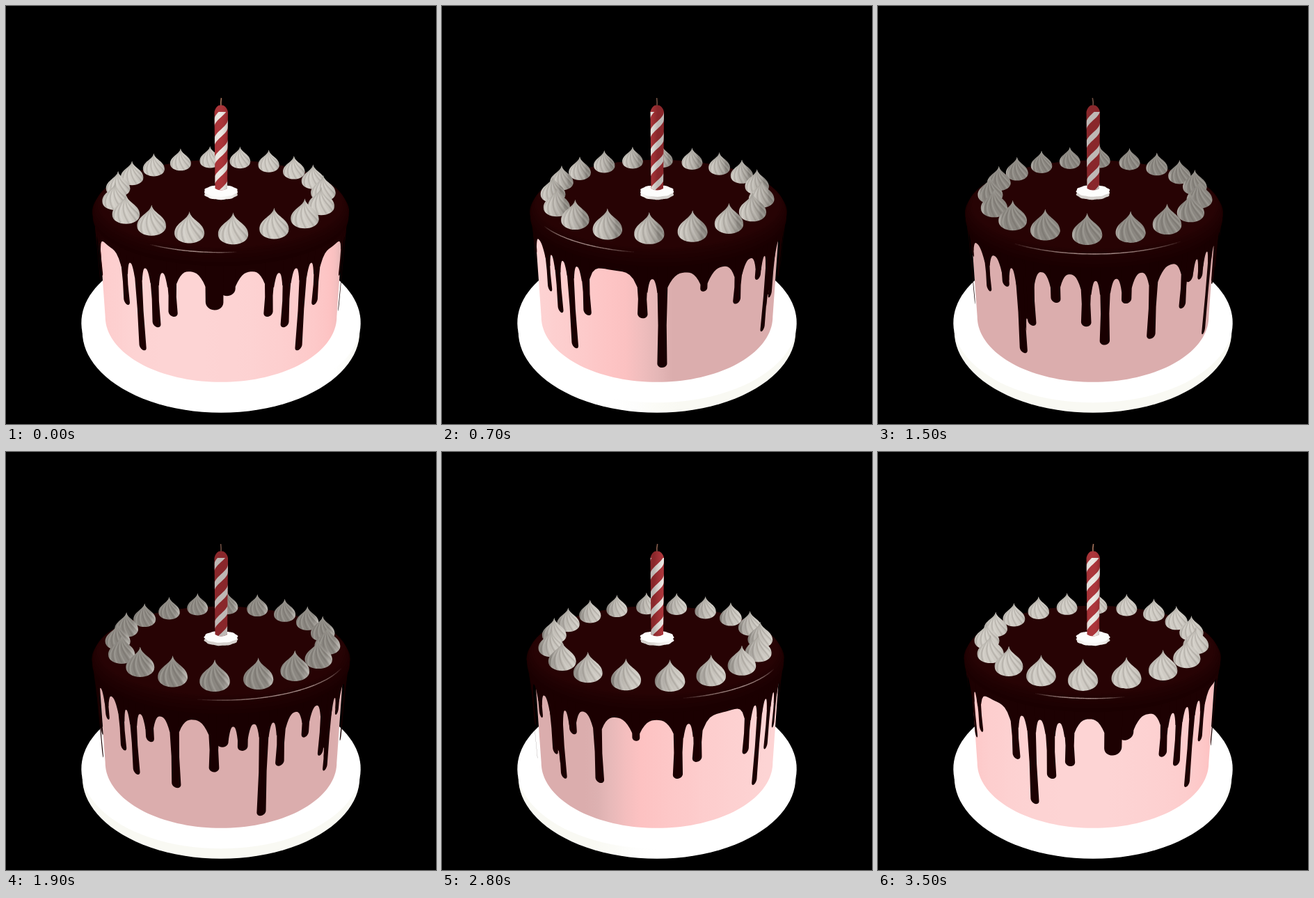
An HTML page with a canvas for the animation above (3.6 s loop, 618 by 600 pixels).

```html
<!DOCTYPE html>
<html lang="en">
<head>
<meta charset="utf-8">
<title>Birthday cake</title>
<style>
html, body { margin: 0; width: 100%; height: 100%; overflow: hidden; background: #000; }
canvas { display: block; }
</style>
</head>
<body>
<canvas id="stage" width="618" height="600"></canvas>
<script>
const ctx = document.getElementById('stage').getContext('2d');
const STEP = 100, STEPS = 36;
const CX = 309, CY = 267, DIST = 730, SIN = 0.348, COS = 0.937;
const LIGHT = -15;
const rad = d => d * Math.PI / 180;
const sin = d => Math.sin(rad(d));
const cos = d => Math.cos(rad(d));
const mix = (a, b, t) => a + (b - a) * t;
const wrap = d => ((d + 180) % 360 + 360) % 360 - 180;
const rgb = (r, g, b) => `rgb(${Math.round(r)},${Math.round(g)},${Math.round(b)})`;
const blend = (a, b, t) => rgb(...a.map((v, i) => mix(v, b[i], t)));

let turn = 0;

// x to the right, h down from the cake top, z towards the viewer
function project(x, h, z) {
  const s = 1 / (1 - (z * COS - h * SIN) / DIST);
  return [CX + x * s, CY + (h * COS + z * SIN) * s, s];
}
const polar = (r, a, h) => project(r * sin(a), h, r * cos(a));
// The icing and the swirls sit slightly off the turning axis
const offset = (r, a, h, dist, dir) =>
  project(r * sin(a) + dist * sin(dir - turn), h, r * cos(a) + dist * cos(dir - turn));
const icing = (r, a, h) => offset(r, a, h, 2.2, 190);

const facing = a => cos(a + turn - LIGHT);
const lit = a => Math.max(0, facing(a));
const softLit = a => Math.sqrt(Math.max(0, (facing(a) + 0.5) / 1.5));

function fillShape(points, paint) {
  ctx.beginPath();
  points.forEach(p => ctx.lineTo(p[0], p[1]));
  ctx.closePath();
  ctx.fillStyle = paint;
  ctx.fill();
}

function ring(point) {
  return Array.from({ length: 120 }, (_, i) => point(i * 3));
}

// Horizontal gradient whose colour depends on the facing angle
function sideGradient(x, half, colour) {
  const g = ctx.createLinearGradient(x - half, 0, x + half, 0);
  for (let a = -90; a <= 90; a += 9) g.addColorStop((sin(a) + 1) / 2, colour(a));
  return g;
}

// Angle, length, and length on the mirrored half where it differs
const half = [
  [18.4, 96], [25.8, 117], [33.5, 160], [41.2, 102], [64, 92], [71.4, 162, 112],
  [87, 60], [102, 89, 126], [113.4, 68], [120.6, 156, 141], [125.3, 111],
  [135.6, 72], [147, 101], [154, 127, 168], [162, 72], [172.6, 128, 100]
];
const drip = (a, len, w = len < 66 ? 1.4 : 1.9) => ({ a, len, w, tip: len - w * 3.1 });
const drips = [
  ...half.flatMap(([a, len, other = len]) => [drip(a, len), drip(360 - a, other)]),
  drip(357.7, 81, 3.3), drip(2.4, 62, 3), drip(190.5, 66, 2.2)
].sort((p, q) => p.a - q.a);
const DRIP_R = 179.5, RIM_R = 181.3;

const arches = drips.flatMap((d, i) => {
  const next = drips[i + 1] || { ...drips[0], a: drips[0].a + 360 };
  const from = d.a + d.w, gap = next.a - next.w - from;
  if (gap < 0.3) return [];
  const top = gap < 2 ? Math.min(d.len, next.len) - 8 : mix(42, 32, Math.min(1, (gap - 2) / 6));
  const power = gap > 14 ? 5 : 2.6;
  return Array.from({ length: 15 }, (_, k) => {
    const t = k / 7 - 1;
    const drop = Math.max(0, Math.min(18, (t < 0 ? d.tip : next.tip) - top));
    return [from + gap * k / 14, top + drop * Math.abs(t) ** power];
  });
});

function icingBand(from, to, paint) {
  const pts = [];
  for (let a = to; a >= from; a -= 3) pts.push(icing(RIM_R, a, 14));
  for (let s = -720; s <= 720; s += 360)
    for (const [a, h] of arches) {
      const t = a + s - turn;
      if (t >= from && t <= to) pts.push(icing(DRIP_R, t, h));
    }
  fillShape(pts, paint);
}

function drawDrip({ a, len, w, tip }, paint) {
  const pts = [], waist = len > 85 ? 0.84 : 1, middle = mix(46, tip, 0.5);
  const add = (u, h) => pts.push(icing(DRIP_R, wrap(a - turn) + u * w, h));
  add(-1, 20);
  add(-1, 46);
  add(-waist, middle);
  for (let q = 0; q <= 180; q += 15) add(-cos(q), tip + (len - tip) * sin(q));
  add(waist, middle);
  add(1, 46);
  add(1, 20);
  fillShape(pts, paint);
}

function drawPlate() {
  fillShape(ring(a => polar(211.5, a, 200)),
    sideGradient(CX, 200, a => blend([249, 249, 243], [255, 255, 255], Math.min(1, lit(a) * 3))));
  fillShape(ring(a => polar(211.5, a, 185)), '#fff');
}

function drawSponge() {
  const pts = [];
  for (let a = -78; a <= 78; a += 2) pts.push(polar(177, a, 185));
  for (let a = 78; a >= -78; a -= 2) pts.push(polar(174, a, 18));
  const g = ctx.createLinearGradient(135, 0, 483, 0);
  for (let a = -78; a <= 78; a += 6) {
    const L = lit(a), gb = 173 + 39 * L ** 0.55;
    const x = polar(176, a, 90)[0];
    g.addColorStop(Math.min(1, Math.max(0, (x - 135) / 348)), rgb(Math.min(253, 219 + 110 * L), gb, gb));
  }
  fillShape(pts, g);
}

function drawShine() {
  const mid = 4 - 36 * sin(turn + 25), spread = 26 - 9 * cos(turn);
  const at = u => icing(RIM_R - 4, mid + u * spread, 7);
  ctx.lineWidth = 1.4;
  for (let u = -1; u < 1; u += 0.05) {
    const p = at(u), q = at(u + 0.05);
    ctx.strokeStyle = `rgba(235,215,208,${0.65 * (1 - u * u)})`;
    ctx.beginPath();
    ctx.moveTo(p[0], p[1]);
    ctx.lineTo(q[0], q[1]);
    ctx.stroke();
  }
}

function drawTop() {
  for (let q = 0; q <= 90; q += 15)
    fillShape(ring(a => icing(RIM_R - 10 * (1 - cos(q)), a, 22 - 18 * sin(q))),
      blend([27, 0, 1], [39, 3, 4], q / 90));
  drawShine();
}

function drawSwirl(x, y, s, angle) {
  ctx.save();
  ctx.translate(x, y);
  ctx.scale(s, s);
  ctx.beginPath();
  ctx.moveTo(0, -28);
  ctx.bezierCurveTo(1.5, -18, 17.6, -15, 17.6, -2.5);
  ctx.bezierCurveTo(17.6, 5, 9, 9.3, 0, 9.3);
  ctx.bezierCurveTo(-9, 9.3, -17.6, 5, -17.6, -2.5);
  ctx.bezierCurveTo(-17.6, -15, -1.5, -18, 0, -28);
  ctx.fillStyle = sideGradient(0, 17.6, a => blend([139, 135, 129], [208, 204, 197], softLit(a)));
  ctx.fill();
  ctx.clip();
  const ridge = (start, colour) => {
    ctx.beginPath();
    for (let t = 0; t <= 1; t += 0.1) {
      const q = start + 66 * t, w = 17.6 * sin(t * 90) ** 1.7;
      ctx.lineTo(w * sin(q), -28 + (28 + 9 * cos(q)) * t);
    }
    ctx.strokeStyle = colour;
    ctx.lineWidth = 2;
    ctx.stroke();
  };
  for (let k = 0; k < 10; k++) {
    const q = angle + k * 36;
    if (cos(q + 57) < -0.1) continue;
    ridge(q, 'rgba(70,64,58,.15)');
    ridge(q + 14, 'rgba(255,253,248,.13)');
  }
  ctx.restore();
}

function drawCandle() {
  const frill = h => ring(a => polar(24 + 0.6 * cos(10 * (a + turn)), a, h));
  fillShape(frill(2.5), sideGradient(CX, 24, a => blend([214, 210, 206], [250, 249, 247], lit(a))));
  fillShape(frill(-2), '#fdfdfc');

  const bend = sin(40 - turn);
  ctx.strokeStyle = blend([112, 78, 66], [168, 116, 92], lit(0));
  ctx.lineWidth = 1.6;
  ctx.beginPath();
  ctx.moveTo(309, 145);
  ctx.quadraticCurveTo(309 - bend, 138, 309 + bend * 0.8, 132);
  ctx.stroke();

  ctx.save();
  ctx.beginPath();
  ctx.moveTo(299.5, 152);
  ctx.quadraticCurveTo(301, 145, 306, 142.5);
  ctx.lineTo(312, 142.5);
  ctx.quadraticCurveTo(317.5, 145, 319, 152);
  ctx.lineTo(318, 262);
  ctx.quadraticCurveTo(309, 267, 300.5, 262);
  ctx.closePath();
  ctx.fillStyle = sideGradient(309, 10, a => blend([137, 39, 43], [172, 54, 59], lit(a)));
  ctx.fill();
  ctx.clip();
  ctx.beginPath();
  ctx.rect(299, 152, 21, 115);
  ctx.clip();
  const white = sideGradient(309, 10, a => blend([190, 184, 181], [236, 231, 226], lit(a)));
  const pitch = 28.3, shift = pitch * (turn % 180) / 180;
  for (let k = -1; k < 6; k++) {
    const mid = 154 + k * pitch - shift, pts = [];
    const edge = (a, off) => pts.push([309.2 + 9.8 * sin(a), mid - pitch * a / 180 + off]);
    for (let a = -90; a <= 90; a += 15) edge(a, -5.4);
    for (let a = 90; a >= -90; a -= 15) edge(a, 5.4);
    fillShape(pts, white);
  }
  ctx.restore();
}

function drawToppings() {
  const items = [{ depth: 1, draw: drawCandle }];
  for (let k = 0; k < 18; k++) {
    const a = 6.4 + 20 * k - turn;
    const [x, y, s] = offset(148, a, 1.2, 2.5, 245);
    items.push({ depth: s, draw: () => drawSwirl(x, y, s, a) });
  }
  items.sort((p, q) => p.depth - q.depth).forEach(o => o.draw());
}

function render(n) {
  turn = n * 10;
  ctx.fillStyle = '#000';
  ctx.fillRect(0, 0, 618, 600);
  const side = blend([25, 0, 1], [29, 1, 2], lit(0));
  const isFront = d => Math.abs(wrap(d.a - turn)) < 76;
  drawPlate();
  icingBand(76, 284, side);
  drips.filter(d => !isFront(d)).forEach(d => drawDrip(d, side));
  drawSponge();
  icingBand(-78, 78, side);
  drips.filter(isFront).forEach(d => drawDrip(d, side));
  drawTop();
  drawToppings();
}

const start = performance.now();
function tick() {
  render(Math.floor((performance.now() - start) / STEP) % STEPS);
  requestAnimationFrame(tick);
}
tick();
</script>
</body>
</html>
```
